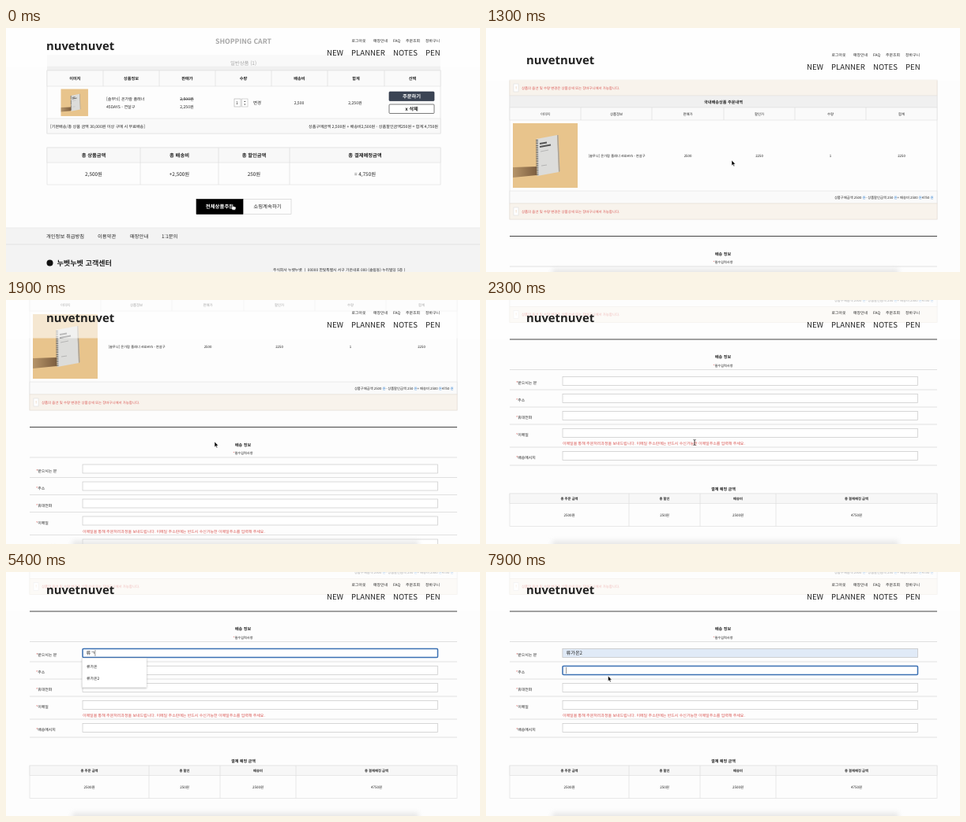
These frames come from a looping animation (600 by 310 pixels, 8 s). An HTML page:

```html
<!DOCTYPE html>
<html lang="ko">
<head>
<meta charset="utf-8">
<title>주문서 작성</title>
<style>
html, body { margin: 0; width: 100%; height: 100%; overflow: hidden; background: #fdfdfd; }
svg { display: block; width: 600px; height: 310px; }
text { font-family: "Noto Sans CJK KR", "Noto Sans CJK", "Noto Sans CJK JP", sans-serif; font-weight: 500; text-rendering: geometricPrecision; white-space: pre; }
.b { font-weight: 700; }
.logo { font-family: "Noto Sans", "Open Sans", sans-serif; font-weight: 600; }
.red { fill: #d9534f; }
.blue { fill: #2f7fd0; }
</style>
</head>
<body>
<svg id="stage" viewBox="0 0 600 310">
  <defs>
    <filter id="soft" x="-20%" y="-200%" width="140%" height="500%"><feGaussianBlur stdDeviation="3"/></filter>
    <filter id="drop" x="-10%" y="-10%" width="120%" height="120%"><feDropShadow dx="0" dy=".7" stdDeviation="1" flood-opacity=".3"/></filter>
    <linearGradient id="shade"><stop stop-color="#6b4d33" stop-opacity=".4"/><stop offset="1" stop-color="#6b4d33" stop-opacity=".85"/></linearGradient>
    <g id="photo">
      <rect width="82" height="82" fill="#e8c48c"/>
      <path d="M0 56L30 55V66L0 69Z" fill="url(#shade)"/>
      <path d="M30 20L56 15L58 62L31 67Z" fill="#dcdcda"/>
      <path d="M56 15L58 62L59.500 61L57.500 15Z" fill="#a9a39a"/>
      <path d="M30.500 21L31 67" stroke="#555" stroke-width="3" stroke-dasharray="1 1.300"/>
      <path d="M34 26l9-1.500M34 30l14-2.500" stroke="#555" stroke-width="2"/>
      <path d="M35 36l10-2M36 54l7-1" stroke="#aaa" stroke-width=".8"/>
    </g>
  </defs>
  <rect width="600" height="310" fill="#fdfdfd"/>
  <g id="cart"></g>
  <g id="order"></g>
  <g id="form"></g>
  <rect id="glow" x="84" y="306" width="438" height="12" fill="#ddd" opacity=".7" filter="url(#soft)"/>
  <g id="header"></g>
  <g id="pointer"></g>
</svg>
<script>
const $ = id => document.getElementById(id);
const LOOP = 8000, MAX_SCROLL = 214.5;

// Text is placed by the middle of its line.
const text = (x, y, s, size, { anchor = 'middle', fill = '#222', cls = '', more = '' } = {}) =>
  `<text x="${x}" y="${y + size * .37}" font-size="${size}" text-anchor="${anchor}" fill="${fill}" class="${cls}" ${more}>${s}</text>`;
const left = (x, y, s, size, o) => text(x, y, s, size, { anchor: 'start', ...o });
const right = (x, y, s, size, o) => text(x, y, s, size, { anchor: 'end', ...o });
const rect = (x, y, x2, y2, fill, stroke = 'none', w = .6, more = '') =>
  `<rect x="${x}" y="${y}" width="${x2 - x}" height="${y2 - y}" fill="${fill}" stroke="${stroke}" stroke-width="${w}" ${more}/>`;
const line = (x, y, x2, y2, stroke = '#ddd', w = .7) =>
  `<path d="M${x} ${y}L${x2} ${y2}" stroke="${stroke}" stroke-width="${w}"/>`;
const columns = (xs, y, y2) => xs.slice(1, -1).map(x => line(x, y, x, y2)).join('');
const cells = (xs, y, labels, size, o) =>
  labels.map((s, i) => text((xs[i] + xs[i + 1]) / 2, y, s, size, o)).join('');
const bold = { cls: 'b' };
const product = ['[솔무늬] 온가람 플래너', '45DAYS - 연살구'];

function drawCart() {
  const cols = [52, 123, 194, 265, 336, 407, 479, 550];
  const sums = [52, 170, 269, 359, 550];
  return text(300.5, 17, 'SHOPPING CART', 8.7, bold) +
    rect(52, 34, 550, 54, '#f0f0f0') + text(300.5, 44.5, '일반상품 (1)', 6.4) +
    rect(52, 54, 550, 134, '#fdfdfd', '#ddd') + rect(52, 54, 550, 74, '#fafafa', '#ddd') +
    columns(cols, 54, 74) +
    cells(cols, 64, ['이미지', '상품정보', '판매가', '수량', '배송비', '합계', '선택'], 5.2, bold) +
    '<use href="#photo" transform="translate(69.500 77.500) scale(.42)"/>' +
    left(127, 90, product[0], 5.1) + left(127, 100, product[1], 5.1) +
    text(229, 90, '2,500원', 5.1, { more: 'text-decoration="line-through"' }) + text(229, 100, '2,250원', 5.1) +
    rect(289, 90, 297, 100, '#fff', '#aaa') + text(292.5, 95, '1', 5) +
    rect(298.5, 90, 306, 100, '#fff', '#bbb') +
    '<path d="M301 94l1.300-1.500 1.300 1.500zM301 96.500l1.300 1.500 1.300-1.500z" fill="#555"/>' +
    text(318, 95, '변경', 5.5) + text(371, 95.5, '2,500', 5.1) + text(442, 95.5, '2,250원', 5.1) +
    rect(485, 81, 542, 92.5, '#3b4454', '#2d3545', .7, 'rx="1"') + text(513.5, 87, '주문하기', 6.3, { cls: 'b', fill: '#fff' }) +
    rect(485, 97, 542, 108.5, '#fff', '#444', .7, 'rx="1"') + text(513.5, 103, 'x 삭제', 6.2, bold) +
    rect(52, 115, 550, 134, '#f9f9f9', '#ddd') +
    left(56, 125, '[기본배송/총 상품 금액 30,000원 이상 구매 시 무료배송]', 5.1) +
    right(547, 125, '상품구매금액 2,500원 + 배송비2,500원 - 상품할인금액250원 = 합계:4,750원', 5.1) +
    rect(52, 152, 550, 199, '#fdfdfd', '#ddd') + rect(52, 152, 550, 171, '#f8f8f8', '#ddd') + columns(sums, 152, 199) +
    cells(sums, 162, ['총 상품금액', '총 배송비', '총 할인금액', '총 결제예정금액'], 6.3, bold) +
    cells(sums, 185.5, ['2,500원', '+2,500원', '250원', '= 4,750원'], 6.4) +
    rect(300, 217.5, 361, 236.5, '#fdfdfd', '#ccc') + rect(241, 217.5, 300, 236.5, '#000', '#000') +
    text(270.5, 227, '전체상품주문', 6.4, { cls: 'b', fill: '#fff' }) + text(331, 227, '쇼핑계속하기', 6.4) +
    rect(0, 254, 600, 310, '#f3f3f3') + line(0, 254, 600, 254, '#e4e4e4') + line(0, 275, 600, 275, '#d8d8d8') +
    [[51, '개인정보 취급방침'], [116, '이용약관'], [157, '매장안내'], [197, '1:1문의']]
      .map(([x, s]) => left(x, 264.5, s, 6.3)).join('') +
    '<circle cx="55.500" cy="298.500" r="4" fill="#111"/>' + left(64.5, 298.5, '누벳누벳 고객센터', 9.1, bold) +
    left(338, 307, '주식회사 누벳누벳 ㅣ 00000 한빛특별시 서구 가온내로 000 (솔림동) 누리빌딩 5층ㅣ', 4.8);
}

function notice(y) {
  return rect(30, y, 571, y + 20, '#f8f3ec', '#e6ded2') + rect(35, y + 5, 41, y + 15, '#fff', '#ddd') +
    text(38, y + 10, '!', 5, { fill: '#c96' }) +
    left(45, y + 10, '상품의 옵션 및 수량 변경은 상품상세 또는 장바구니에서 가능합니다.', 4.4, { cls: 'red' });
}

const star = s => `<tspan class="red">*</tspan>${s}`;
const fieldTop = [312, 334, 356, 378, 407];

function drawOrder() {
  const cols = [30, 120, 210, 301, 391, 481, 571];
  const sums = [30, 181, 271, 367, 571];
  const won = '<tspan class="blue">원</tspan>';
  const labels = ['받으시는 분', '주소', '휴대전화', '이메일', '배송메시지'];
  return rect(30, 66, 571, 243, '#fdfdfd', '#ddd') + notice(66) +
    rect(30, 86, 571, 101, '#f0f0f0', '#e2e2e2') + text(300.5, 94, '국내배송상품 주문내역', 5.2, bold) +
    rect(30, 101, 571, 117, '#fafafa', '#ddd') + columns(cols, 101, 117) +
    cells(cols, 109, ['이미지', '상품정보', '판매가', '할인가', '수량', '합계'], 4.4) +
    '<use href="#photo" x="34" y="121"/>' + left(129.5, 162, product.join(' '), 4.25) +
    cells(cols.slice(2), 162, ['2500', '2250', '1', '2250'], 4.4) +
    rect(30, 207, 571, 223, '#fafafa', '#ddd') +
    right(566.5, 215, `상품구매금액 2500 ${won}- 상품할인금액 250 ${won}+ 배송비 2500 ${won}4750 ${won}`, 4.3) +
    notice(223) + line(30, 264.5, 571, 264.5, '#444', 1) +
    text(300, 287, '배송 정보', 5.1, bold) + text(300, 297.5, star('필수입력사항'), 4.2) +
    [303, 328.5, 350.5, 372.5, 401.5, 424.5].map(y => line(30, y, 571, y, '#d4d4d4')).join('') +
    labels.map((s, i) => left(38, fieldTop[i] + 7.8, star(s), 4.9)).join('') +
    fieldTop.map(y => rect(97, y, 546.5, y + 11, '#fff', '#c8c8c8', .7)).join('') +
    left(97, 396.8, '이메일을 통해 주문처리과정을 보내드립니다. 이메일 주소란에는 반드시 수신가능한 이메일주소를 입력해 주세요.', 4.97, { cls: 'red' }) +
    text(300.5, 455, '결제 예정 금액', 5.1, bold) +
    rect(30, 460.5, 571, 502, '#fdfdfd', '#ddd') + rect(30, 460.5, 571, 473, '#f7f7f7', '#ddd') + columns(sums, 460.5, 502) +
    cells(sums, 467, ['총 주문 금액', '총 할인', '배송비', '총 결제예정 금액'], 4.3, bold) +
    cells(sums, 487.5, ['2500원', '250원', '2500원', '4750원'], 4.5);
}

function drawHeader() {
  const small = [[437.5, '로그아웃'], [465, '매장안내'], [490, 'FAQ'], [506, '주문조회'], [531, '장바구니']];
  const big = [[406, 'NEW'], [437, 'PLANNER'], [490, 'NOTES'], [531, 'PEN']];
  return rect(0, -20, 600, 48.5, 'rgba(255,255,255,.6)') +
    left(51, 23, 'nuvetnuvet', 14.8, { cls: 'logo' }) +
    small.map(([x, s]) => left(x, 16, s, 4.9)).join('') + big.map(([x, s]) => left(x, 31, s, 9.6)).join('');
}

const saved = ['누벳누벳', 'asdf', 'aa', '노담우', 'adsf', '누벳누벳3'];
const matches = ['류가온', '류가온2'];
const typing = [[4700, 'ㄹ'], [5000, '류'], [5300, '류ㄱ'], [5500, '류가'], [5800, '류가ㅇ'], [5900, '류가오'], [6100, '류가온']];
const CLICK = 3200, TAB = 6400, HOVER = 7300, PICK = 7500;

function menu(items, hover) {
  return rect(96.5, 109.5, 178, 116.2 + 15.25 * items.length, '#fff', '#ddd', .4, 'filter="url(#drop)"') +
    items.map((s, i) => {
      const y = 120 + 15.25 * i;
      return (i === hover ? rect(96.7, y - 7.5, 177.8, y + 7.5, '#eee') : '') + left(102, y, s, 4.9);
    }).join('');
}

function drawForm(t) {
  if (t < CLICK) return '';
  const top = i => fieldTop[i] - MAX_SCROLL;
  const picked = t >= HOVER;
  const typed = picked ? matches[1] : (typing.filter(k => k[0] <= t).pop() || [0, ''])[1];
  const y = top(t < TAB ? 0 : 1);
  const blink = (t - (t < PICK ? 3100 : PICK)) % 1000 < 500;
  const caretX = 101.5 + (t < TAB ? typed.length * 5.7 : 0);
  return (picked ? rect(97, top(0), 546.5, top(0) + 11, '#e0eaf7', '#c8c8c8', .7) : '') +
    rect(97, y, 546.5, y + 11, '#fff', '#3b70b3', 1.5, 'rx="1.3"') +
    left(101.5, 103.2, typed, 6.2) +
    (blink ? line(caretX, y + 1.5, caretX, y + 9.5, '#555', .6) : '') +
    (t < PICK ? menu(t < typing[0][0] ? saved : matches, picked ? 1 : -1) : '');
}

const shapes = {
  hand: '<path d="M-1 -2.500q1-1 1.500 0v2l3 .7q1 .5.500 2l-.8 2h-3.500l-2.500-3q.2-1.200 1.800 0z" fill="#fff" stroke="#000" stroke-width=".6"/>',
  arrow: '<path d="M0 0V6.700L1.500 5.400L2.600 7.800L3.700 7.300L2.600 5L4.700 4.900Z" fill="#000" stroke="#fff" stroke-width=".5"/>',
  beam: '<path d="M-1.500 -3.500Q0 -3.500 0 -2.500V2.500Q0 3.500 -1.500 3.500M1.500 -3.500Q0 -3.500 0 -2.500M0 2.500Q0 3.500 1.500 3.500" fill="none" stroke="#222" stroke-width=".8"/>'
};
const path = [[0, 287, 227], [900, 287, 227], [1300, 311, 168], [1600, 311, 168], [1900, 264, 180], [2300, 264, 181],
  [2700, 264, 181], [3100, 231, 107], [6700, 231, 107], [7300, 154.5, 132]];
const scroll = [[1400, 0], [1900, 103], [2200, MAX_SCROLL]];

function along(keys, t, k = 1) {
  const i = keys.findIndex(p => p[0] > t);
  if (i < 1) return i ? keys[keys.length - 1][k] : keys[0][k];
  const [a, b] = [keys[i - 1], keys[i]];
  return a[k] + (b[k] - a[k]) * (t - a[0]) / (b[0] - a[0]);
}

$('cart').innerHTML = drawCart();
$('order').innerHTML = drawOrder();
$('header').innerHTML = drawHeader();

function frame(now) {
  const t = Math.floor(now % LOOP / 100) * 100; // the screen updates ten times a second
  const ordering = t >= 1100;
  const s = along(scroll, t);
  $('cart').style.display = ordering ? 'none' : '';
  $('order').style.display = $('glow').style.display = ordering ? '' : 'none';
  $('order').setAttribute('transform', `translate(0 ${-s})`);
  $('header').setAttribute('transform', `translate(0 ${ordering ? Math.max(0, 18 - s) : 0})`);
  $('form').innerHTML = drawForm(t);
  const kind = t < 1100 ? 'hand' : t < 2200 || t >= 6800 ? 'arrow' : 'beam';
  $('pointer').innerHTML = t >= 4700 && t < 6800 ? '' : shapes[kind];
  $('pointer').setAttribute('transform', `translate(${along(path, t)} ${along(path, t, 2)})`);
  requestAnimationFrame(frame);
}
requestAnimationFrame(frame);
</script>
</body>
</html>
```
